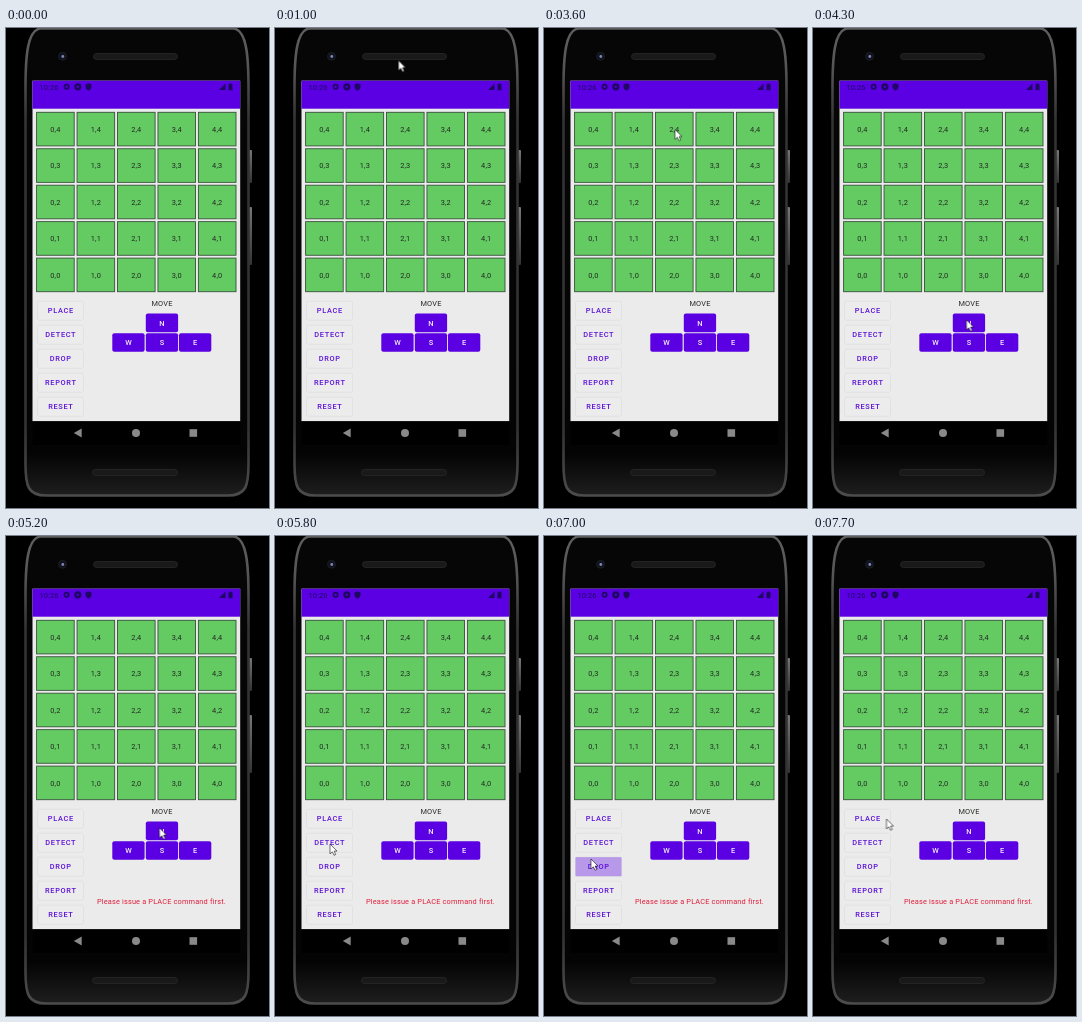
Recreate the animation shown at these times as an HTML page. Size 263 px wide and 480 px high, loop 8 s.

```html
<!DOCTYPE html>
<html lang="en">
<head>
<meta charset="utf-8">
<title>Robot grid</title>
<style>
  html, body { margin: 0; width: 100%; height: 100%; overflow: hidden; background: #000; }
  svg { display: block; }
  #stage { width: 100vw; height: 100vh; }
  text { font: 7.4px Roboto, sans-serif; text-anchor: middle; fill: #232823; letter-spacing: .15px; }
  .btn text { font-weight: 500; letter-spacing: .66px; }
  .line rect { fill: #ececec; stroke: #dfdfe2; stroke-width: .8px; }
  .line text { fill: #5c12d8; }
  .solid text { fill: #f4eeff; }
  .solid .base { fill: #5a00e2; }
  .cell { fill: #64cb63; stroke: #37503a; stroke-width: .9px; }
  .icon { fill: #1f0764; }
  #note { fill: #e01f3c; text-anchor: start; }

  #cursor, #note, .ripple { animation: 8s step-end infinite; }
  #cursor { animation-name: pointer; }
  #note { animation-name: note; }
  .ripple { opacity: 0; }
  #rN { fill: #fff; animation-name: pressN; }
  #rDETECT { fill: #5a00e2; animation-name: pressDetect; }
  #rDROP { fill: #5a00e2; animation-name: pressDrop; }

  /* 1.25% = one 100 ms step */
  @keyframes pointer {
    0% { transform: translate(-20px, -20px); }
    8.75% { transform: translate(84px, 112px); animation-timing-function: steps(2); }
    11.25% { transform: translate(114px, 46px); }
    12.5% { transform: translate(123.5px, 32.5px); }
    13.75% { transform: translate(126px, 27px); }
    16.25% { transform: translate(127.5px, 24px); }
    17.5% { transform: translate(128px, 22px); }
    20% { transform: translate(128px, 18px); }
    21.25% { transform: translate(128px, 13px); }
    22.5% { transform: translate(-20px, -20px); }
    42.5% { transform: translate(128px, 13px); animation-timing-function: steps(4); }
    47.5% { transform: translate(134px, 190px); animation-timing-function: steps(4); }
    52.5%, 65% { transform: translate(153.5px, 292px); }
    66.25% { transform: translate(130px, 299px); }
    67.5% { transform: translate(82px, 309px); }
    68.75% { transform: translate(51px, 311px); }
    71.25% { transform: translate(55px, 308px); }
    82.5% { transform: translate(53px, 314px); }
    83.75% { transform: translate(48px, 321px); }
    85% { transform: translate(47px, 323px); }
    93.75% { transform: translate(52px, 314px); }
    95% { transform: translate(64px, 298px); }
    96.25%, 100% { transform: translate(73.5px, 283px); }
  }
  @keyframes note {
    0% { opacity: 0; }
    57.5%, 100% { opacity: 1; }
  }
  @keyframes pressN {
    0% { opacity: 0; r: 4px; }
    55% { opacity: .24; r: 4px; animation-timing-function: steps(3); }
    58.75% { opacity: .24; r: 26px; animation-timing-function: steps(3); }
    62.5%, 100% { opacity: 0; r: 26px; }
  }
  @keyframes pressDetect {
    0% { opacity: 0; r: 4px; }
    75% { opacity: .36; r: 6px; animation-timing-function: steps(2); }
    77.5% { opacity: .36; r: 50px; }
    80% { opacity: .36; r: 50px; animation-timing-function: steps(3); }
    83.75%, 100% { opacity: 0; r: 50px; }
  }
  @keyframes pressDrop {
    0% { opacity: 0; r: 4px; }
    86.25% { opacity: .36; r: 6px; animation-timing-function: steps(2); }
    88.75% { opacity: .36; r: 50px; animation-timing-function: steps(3); }
    92.5%, 100% { opacity: 0; r: 50px; }
  }
</style>
</head>
<body>
<svg id="stage" viewBox="0 0 263 480">
  <defs>
    <linearGradient id="rim" x2="0" y2="1">
      <stop offset="0" stop-color="#5e5e5e"/>
      <stop offset=".08" stop-color="#565656"/>
      <stop offset=".2" stop-color="#333"/>
      <stop offset=".85" stop-color="#333"/>
      <stop offset="1" stop-color="#4c4c4c"/>
    </linearGradient>
    <linearGradient id="shell" x2="0" y2="1">
      <stop offset="0" stop-color="#060606"/>
      <stop offset=".91" stop-color="#040404"/>
      <stop offset="1" stop-color="#1e1e1e"/>
    </linearGradient>
    <linearGradient id="key" x2="0" y2="1">
      <stop offset="0" stop-color="#777"/>
      <stop offset="1" stop-color="#333"/>
    </linearGradient>
  </defs>

  <!-- phone -->
  <g fill="url(#key)">
    <rect x="243" y="122" width="3" height="33" rx="1"/>
    <rect x="243" y="179" width="3" height="58" rx="1"/>
  </g>
  <path d="M19.5 60C19.5 30 21 1 35 .5H227C241 1 242.5 30 242.5 60V436C242.5 458 240 467.5 222 467.5H40C22 467.5 19.5 458 19.5 436Z"
    fill="url(#shell)" stroke="url(#rim)" stroke-width="2.6"/>
  <g fill="#191919" stroke="#292929" stroke-width=".8">
    <rect x="87.5" y="25.5" width="84" height="6" rx="3"/>
    <rect x="86.5" y="441.5" width="85" height="6" rx="3"/>
  </g>
  <circle cx="56.5" cy="28.3" r="4" fill="#10131c" stroke="#1d2028" stroke-width=".8"/>
  <circle cx="56.8" cy="28.5" r="1.4" fill="#8087b8"/>

  <!-- screen -->
  <rect x="26.5" y="52.7" width="207.7" height="340.6" fill="#ebebeb"/>
  <rect x="26.5" y="52.7" width="207.7" height="28" fill="#5a00e2"/>
  <rect x="26.5" y="393.3" width="207.7" height="23.7" fill="#000"/>

  <!-- status bar -->
  <g class="icon">
    <text class="icon" x="43" y="61.5">10:26</text>
    <circle cx="60.6" cy="58.8" r="2.1" fill="none" stroke="#1f0764" stroke-width="1.8"/>
    <circle cx="71.8" cy="58.8" r="3.6"/>
    <circle cx="71.8" cy="58.8" r="1.1" fill="#5a00e2"/>
    <path d="M82.5 55.3l3 1.2v2.6q0 2.4-3 3.7q-3-1.3-3-3.7v-2.6z"/>
    <path d="M213 62h6.5v-6.5z"/>
    <path d="M222.5 56.2h1v-.8h2v.8h1v6h-4z"/>
  </g>

  <g id="grid"></g>
  <text x="156" y="278">MOVE</text>
  <g id="buttons"></g>
  <text id="note" x="91" y="367.6">Please issue a PLACE command first.</text>

  <!-- navigation -->
  <g fill="#898989">
    <path d="M67.8 405l7.9-4.5v9z"/>
    <circle cx="130" cy="405" r="4"/>
    <rect x="183.5" y="401.2" width="7.6" height="7.6"/>
  </g>

  <g id="cursor">
    <path d="M0 0V9.9L2.3 7.8L4 11.3L5.7 10.5L4.1 7.1H7Z" fill="#fff" stroke="#111" stroke-width=".6" stroke-linejoin="round"/>
  </g>
</svg>
<script>
  const byId = id => document.getElementById(id);
  const label = (x, y, s) => `<text x="${x}" y="${y + 2.6}">${s}</text>`;

  let cells = '';
  for (let row = 0; row < 5; row++) {
    for (let col = 0; col < 5; col++) {
      const x = 49.4 + col * 40.45, y = 246.9 - row * 36.45;
      cells += `<rect class="cell" x="${x - 18.8}" y="${y - 16.8}" width="37.6" height="33.6"/>`
        + label(x, y, `${col},${row}`);
    }
  }
  byId('grid').innerHTML = cells;

  // The nested svg clips the ripple to the button.
  const button = (kind, name, x, y, w, h) => `<g class="btn ${kind}">
    <rect class="base" x="${x}" y="${y}" width="${w}" height="${h}" rx="2"/>
    <svg x="${x}" y="${y}" width="${w}" height="${h}" overflow="hidden">
      <circle class="ripple" id="r${name}" cx="${w / 2}" cy="${h / 2}" r="4"/>
    </svg>${label(x + w / 2 + .3, y + h / 2, name)}</g>`;

  byId('buttons').innerHTML =
    ['PLACE', 'DETECT', 'DROP', 'REPORT', 'RESET']
      .map((name, i) => button('line', name, 31.5, 273.2 + i * 24, 46, 19)).join('')
    + [['N', 139.8, 285.6], ['W', 106.3, 305.2], ['S', 139.8, 305.2], ['E', 173, 305.2]]
      .map(([name, x, y]) => button('solid', name, x, y, 32.3, 18.6)).join('');
</script>
</body>
</html>
```
